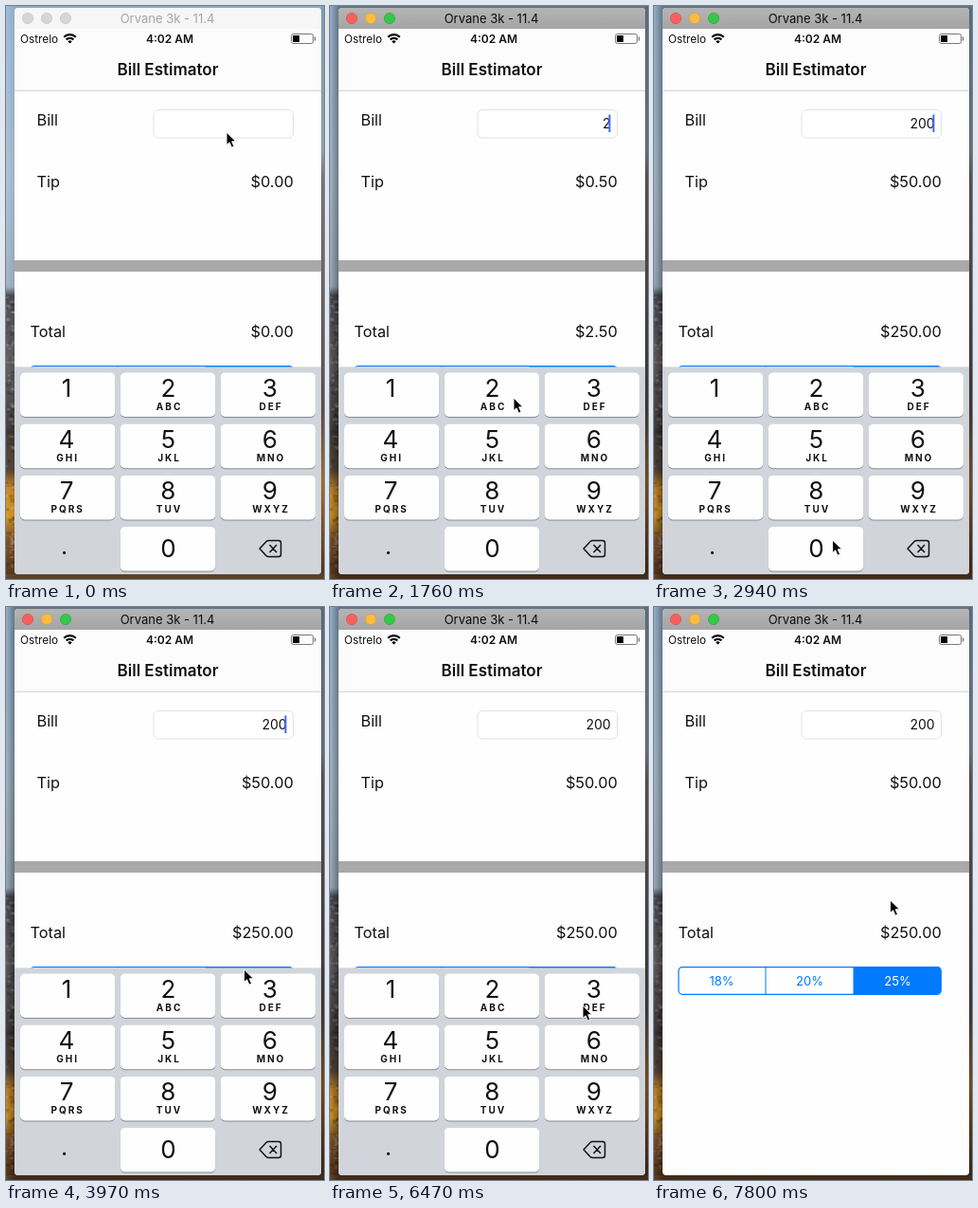
These frames come from a looping animation (336x604 px, 8000 ms). An HTML page:

```html
<!DOCTYPE html>
<html lang="en">
<head>
<meta charset="utf-8">
<style>
  html, body { margin: 0; width: 100%; height: 100%; overflow: hidden; }
  svg { display: block; width: 336px; height: 604px; }
  text { font-family: Inter, Roboto, sans-serif; font-size: 16.3px; fill: #111; }
  .mid { text-anchor: middle; }
  .end { text-anchor: end; }
</style>
</head>
<body>
<svg viewBox="0 0 336 604">
  <defs>
    <linearGradient id="left" x2="0" y2="1">
      <stop offset="0" stop-color="#a4c4df"/><stop offset=".3" stop-color="#b4cbde"/>
      <stop offset=".49" stop-color="#a9bccd"/><stop offset=".505" stop-color="#4f5058"/>
      <stop offset=".62" stop-color="#6a6567"/><stop offset=".74" stop-color="#4a4343"/>
      <stop offset=".81" stop-color="#5a4b3c"/><stop offset=".84" stop-color="#d18f2c"/>
      <stop offset=".89" stop-color="#e0a02a"/><stop offset=".93" stop-color="#85562a"/>
      <stop offset="1" stop-color="#593a22"/>
    </linearGradient>
    <linearGradient id="right" x2="0" y2="1">
      <stop offset="0" stop-color="#91b3d0"/><stop offset=".25" stop-color="#a4b8c8"/>
      <stop offset=".3" stop-color="#8d8585"/><stop offset=".7" stop-color="#65575a"/>
      <stop offset=".83" stop-color="#b77d34"/><stop offset="1" stop-color="#593a22"/>
    </linearGradient>
    <linearGradient id="shadow">
      <stop offset="0" stop-opacity=".1"/><stop offset=".027" stop-opacity=".4"/><stop offset="1" stop-opacity=".4"/>
    </linearGradient>
    <linearGradient id="bar" x2="0" y2="1">
      <stop offset="0" stop-color="#b4b4b4"/><stop offset="1" stop-color="#a5a5a5"/>
    </linearGradient>
    <clipPath id="window"><rect x="9" y="2" width="324" height="597" rx="4"/></clipPath>
  </defs>

  <rect width="336" height="604" fill="url(#left)"/>
  <rect x="333" width="3" height="604" fill="url(#right)"/>
  <rect y="599" width="336" height="5" fill="#6b4a2c"/>
  <g id="rocks"></g>
  <rect id="shade" width="336" height="604" fill="url(#shadow)"/>

  <g clip-path="url(#window)">
    <rect x="9" y="2" width="324" height="597" fill="#fefefe"/>
    <rect id="titleBar" x="9" y="2" width="324" height="22"/>
    <g id="lights"></g>
    <text id="title" class="mid" x="170.5" y="17.8" style="font-size:13px">Orvane 3k - 11.4</text>

    <rect x="9" y="24" width="324" height="65" fill="#fcfcfc"/>
    <path d="M9 89.2H333" stroke="#cfcfcf"/>
    <text x="15" y="38.6" style="font-size:11.8px">Ostrelo</text>
    <g transform="translate(67.5 39)" fill="none" stroke="#000" stroke-width="2.2">
      <path d="M-6.3-6.3A9 9 0 0 1 6.3-6.3M-3.8-3.6A5.4 5.4 0 0 1 3.8-3.6"/>
      <path d="M0 .6L-2.2-1.5A3 3 0 0 1 2.2-1.5Z" fill="#000" stroke="none"/>
    </g>
    <text class="mid" x="173" y="38.6" style="font-size:12px;font-weight:600">4:02 AM</text>
    <rect x="301.5" y="29.5" width="23" height="10" rx="2" fill="none" stroke="#777"/>
    <rect x="303" y="31" width="7" height="7" fill="#000"/>
    <path d="M326.5 32.5V36.5" stroke="#777" stroke-width="1.4"/>
    <text class="mid" x="171" y="72.6" style="font-size:17px;font-weight:600">Bill Estimator</text>

    <text x="32.5" y="126">Bill</text>
    <text x="32.5" y="190.6">Tip</text>
    <text x="25.5" y="348.5">Total</text>
    <text id="tip" class="end" x="303.7" y="190.6"></text>
    <text id="total" class="end" x="303.7" y="348.5"></text>
    <rect x="156" y="109.5" width="147.5" height="29.5" rx="5" fill="#fff" stroke="#e2e2e2"/>
    <text id="bill" class="end" x="296.6" y="129.2" style="font-size:14px"></text>
    <rect id="caret" x="294.4" y="114.5" width="2" height="18.5" fill="#426bf2"/>
    <rect x="9" y="268" width="324" height="12" fill="#a9a9a9"/>

    <g id="segments">
      <path d="M211 379.6H299Q303 379.6 303 384V404Q303 408 299 408H211Z" fill="#007aff"/>
      <rect x="26" y="379.6" width="277.3" height="28.7" rx="4" fill="none" stroke="#007aff" stroke-width="1.2"/>
      <path d="M118 380V408M211 380V408" stroke="#007aff"/>
    </g>
    <g id="keyboard"><rect x="9" y="380.4" width="324" height="240" fill="#d1d5db"/></g>
  </g>
  <path id="cursor" d="M0 0V13.6L3.1 10.8L5.4 16.2L8 15.1L5.7 9.8H10Z" fill="#000" stroke="#fff" stroke-width="1" stroke-linejoin="round"/>
</svg>
<script>
const LOOP = 8000, TICK = 147;
const $ = id => document.getElementById(id);

function add(parent, tag, attrs, text = '') {
  const node = document.createElementNS('http://www.w3.org/2000/svg', tag);
  for (const name in attrs) node.setAttribute(name, attrs[name]);
  node.textContent = text;
  return parent.appendChild(node);
}

// Seeded flecks give the mountain side its rough look.
let seed = 7;
const random = () => (seed = seed * 16807 % 2147483647) / 2147483647;
for (let i = 0; i < 120; i++) {
  add($('rocks'), 'rect', {
    x: random() * 9 - 2, y: 306 + random() * 290, width: 2 + random() * 4, height: 1 + random() * 3,
    fill: i % 2 ? '#000' : '#fff', opacity: .16
  });
}

const lights = [23, 43, 63].map(cx => add($('lights'), 'circle', { cx, cy: 13, r: 5.6, 'stroke-width': .7 }));

['18%', '20%', '25%'].forEach((label, i) => add($('segments'), 'text', {
  class: 'mid', x: 71.5 + i * 93, y: 398.8, style: `font-size:13px;fill:${i === 2 ? '#fff' : '#007aff'}`
}, label));

const keys = {};
function addKey(digit, letters, col, row) {
  const x = 15 + col * 105.8, y = 386.5 + row * 54.2, center = 64 + col * 107.4;
  const box = { x, width: 100.3, height: 46.5, rx: 5 };
  add($('keyboard'), 'rect', { ...box, y: y + 1, fill: '#888b90' });
  keys[digit] = add($('keyboard'), 'rect', { ...box, y });
  add($('keyboard'), 'text', {
    class: 'mid', x: center, y: y + (row === 3 ? 32.3 : 25.3), style: 'font-size:26px'
  }, digit);
  add($('keyboard'), 'text', {
    class: 'mid', x: center + 1.2, y: y + 39.2, style: 'font-size:10px;font-weight:700;letter-spacing:2px'
  }, letters);
}
['', 'ABC', 'DEF', 'GHI', 'JKL', 'MNO', 'PQRS', 'TUV', 'WXYZ']
  .forEach((letters, i) => addKey(i + 1, letters, i % 3, Math.floor(i / 3)));
addKey(0, '', 1, 3);
add($('keyboard'), 'text', { class: 'mid', x: 61.5, y: 578, style: 'font-size:25px' }, '.');
add($('keyboard'), 'path', {
  d: 'M268 572L275 564.5Q276 563.5 277.5 563.5H288Q290.5 563.5 290.5 566V578Q290.5 580.5 288 580.5H277.5Q276 580.5 275 579.5ZM278.5 568L286 576M286 568L278.5 576',
  fill: 'none', stroke: '#111', 'stroke-width': 1.5, 'stroke-linejoin': 'round'
});

// Waypoints: tick, x, y
const pointerPath = [
  [4, 233, 133], [7, 220, 245], [10, 194, 413], [12, 194, 413], [15, 188.6, 563], [21, 188.6, 563],
  [24, 252, 384], [27, 251.5, 382], [30, 183, 384], [33, 222, 384], [37, 172, 500], [40, 250, 576],
  [42, 268, 562], [44, 267, 420], [46, 255, 345], [48, 249.5, 309]
];
// Waypoints: tick, vertical offset
const keyboardPath = [[49, 0], [50, 41.5], [51, 155], [52, 212], [53, 230]];

function follow(path, tick) {
  const next = path.findIndex(point => point[0] > tick);
  if (next < 0) return path[path.length - 1].slice(1);
  if (next === 0) return path[0].slice(1);
  const a = path[next - 1], b = path[next], k = (tick - a[0]) / (b[0] - a[0]);
  return a.slice(1).map((v, i) => v + (b[i + 1] - v) * k);
}

function caretOpacity(tick) {
  if (tick >= 50) return 0;
  if (tick >= 12 && tick < 22) return 1;
  const phase = (tick + (tick < 12 ? 4 : 1)) % 7;
  return [1, 1, 1, 0, 0, 0, .5][phase];
}

function paint(id, attrs) {
  for (const name in attrs) $(id).setAttribute(name, attrs[name]);
}

function draw(time) {
  const tick = Math.floor((time + 5) / TICK);
  const active = tick >= 11;
  const bill = tick < 12 ? '' : tick < 17 ? '2' : tick < 19 ? '20' : '200';
  const money = amount => '$' + amount.toFixed(2);

  paint('shade', { opacity: active ? 1 : .3 });
  paint('titleBar', { fill: active ? 'url(#bar)' : '#f6f6f6' });
  $('title').style.fill = active ? '#0c0c0c' : '#a5a5a5';
  lights.forEach((light, i) => {
    light.setAttribute('fill', active ? ['#fc605c', '#fdbc40', '#34c84a'][i] : '#d6d6d6');
    light.setAttribute('stroke', active ? ['#df4744', '#de9f34', '#27aa35'][i] : '#c2c2c2');
  });

  $('bill').textContent = bill;
  $('tip').textContent = money(bill * .25);
  $('total').textContent = money(bill * 1.25);
  paint('caret', { opacity: caretOpacity(tick) });

  const pressed = tick === 11 ? '2' : tick === 16 || tick === 18 ? '0' : '';
  for (const digit in keys) keys[digit].setAttribute('fill', digit === pressed ? '#b8c2cf' : '#fefefe');

  paint('keyboard', { transform: `translate(0 ${follow(keyboardPath, tick)})` });
  paint('cursor', { transform: `translate(${follow(pointerPath, tick)})` });
}

const start = performance.now();
function frame() {
  draw((performance.now() - start) % LOOP);
  requestAnimationFrame(frame);
}
frame();
</script>
</body>
</html>
```
